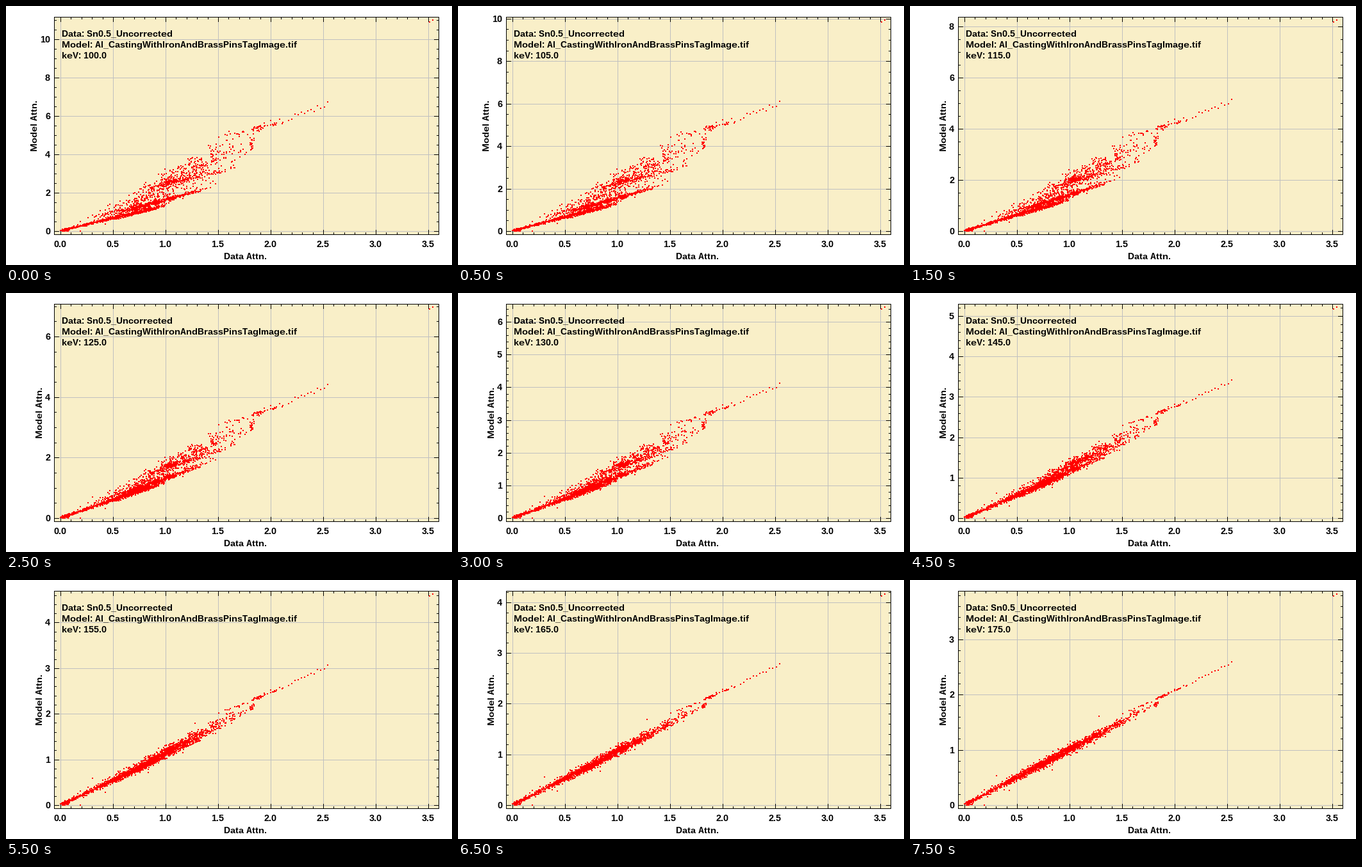
A matplotlib script for the animation above (8 s loop, 696 by 405 pixels).

```python
import matplotlib.pyplot as plt
import numpy as np
from matplotlib.animation import FuncAnimation

W, H, DPI = 696, 405, 72
LEFT, TOP, RIGHT, BOTTOM = 75, 17, 675, 357
X0, Y0, X_SCALE = 85, 352, 164
FRAMES, INTERVAL = 16, 500

plt.rcParams.update({
    "font.family": "Liberation Sans",
    "font.weight": "bold",
    "font.size": 14,
    "text.hinting": "native",
    "text.hinting_factor": 1,
    "text.kerning_factor": 6,
})

fig = plt.figure(figsize=(W / DPI, H / DPI), dpi=DPI, facecolor="white")
ax = fig.add_axes([0, 0, 1, 1])

# Pixels per attenuation unit, a smooth curve through a few energies
SCALE_FIT = np.polyfit([-35, -20, 0, 20, 40], [30, 40, 55.1, 71.4, 86.4], 4)


def y_scale(kev):
    return np.polyval(SCALE_FIT, kev - 135)


def dense(kev):
    """Relative attenuation of the heavy pins, 1 at 175 keV."""
    return y_scale(175) / y_scale(kev)


def light(kev):
    """Relative attenuation of the light casting, 1 at 175 keV."""
    return np.sqrt(175 / kev)


def make_points():
    """Return x and the model value at 100 and 175 keV for every point."""
    rng = np.random.default_rng(12)
    tri, uni = rng.triangular, rng.uniform
    parts = []

    def add(x, ratio, noise):
        """Points near y = x at 175 keV that are ratio times higher at 100."""
        high = np.maximum(x * 1.005 + rng.normal(0, noise, len(x)), 0)
        parts.append((x, ratio * high, high))

    def strand(x, start, slope, noise=0.028):
        add(x, (start + slope * x) / x, noise)

    # origin cluster and casting line
    x = np.abs(rng.normal(0, 0.025, 70))
    parts.append((x, x * 1.3 + 0.03, x + 0.02))
    strand(uni(0.02, 0.5, 270), 0.01, 1.34, 0.022)
    strand(tri(0.42, 0.7, 1.02, 380), 0, 1.31)

    # mixed strand, iron strand and its sparse continuation
    strand(tri(0.5, 0.85, 1.42, 380), 0.135, 1.49)
    strand(tri(0.78, 1.05, 1.33, 130), 1.26, 1.2)
    strand(uni(1.3, 1.66, 32), 1.27, 1.2)

    # scattered mixtures
    add(tri(0.28, 0.7, 1.15, 330), tri(1.25, 1.4, 2.9, 330), 0.045)
    add(tri(0.7, 1.1, 1.5, 300), tri(1.5, 2.4, 3.15, 300), 0.045)
    add(uni(1.22, 1.66, 105), tri(2.0, 2.75, 3.1, 105), 0.04)
    add(rng.normal(1.82, 0.012, 20), uni(2.2, 2.75, 20), 0.02)
    add(uni(1.66, 1.8, 8), uni(2.25, 2.7, 8), 0.02)

    # strays
    x = uni(0, 1.3, 22)
    add(x, uni(1.3, 2.2, 22), 0.2)

    # bent trail of the thickest brass and the far pair
    x = np.concatenate([tri(1.5, 2.0, 2.14, 52), np.linspace(2.17, 2.54, 13)])
    low = np.interp(x, [1.5, 2.05, 2.54], [4.85, 5.62, 6.6])
    low += rng.normal(0, 0.1, len(x))
    x, low = np.append(x, [3.512, 3.543]), np.append(low, [10.9, 11])
    parts.append((x, low, 1.02 * x + 0.34 * (low / 2.6 - 1.02 * x)))
    return [np.concatenate(p) for p in zip(*parts)]


PX, LOW, HIGH = make_points()


def model(kev):
    a, a0 = light(kev), light(100)
    mix = (dense(kev) - a) / (dense(100) - a0)
    return HIGH * a + (LOW - HIGH * a0) * mix


def line(x1, y1, x2, y2, color="black"):
    ax.plot([x1, x2], [y1, y2], color=color, lw=1, antialiased=False,
            solid_capstyle="projecting")


def label(x, baseline, text, **style):
    ax.text(x, baseline - 0.3, text, **style)


def x_tick(x, size):
    line(x, TOP, x, TOP + size)
    line(x, BOTTOM - size, x, BOTTOM)


def y_tick(y, size):
    line(LEFT, y, LEFT + size, y)
    line(RIGHT - size, y, RIGHT, y)


def draw(i):
    kev = 100 + 5 * i
    scale = y_scale(kev)
    ax.clear()
    ax.set(xlim=(0, W), ylim=(H, 0))
    ax.axis("off")
    ax.add_patch(plt.Rectangle((LEFT, TOP), RIGHT - LEFT + 1, BOTTOM - TOP + 1,
                               fc="#f9efc8", ec="none"))

    step, minor = (1, 0.2) if scale >= 50 else (2, 0.5)
    top_value = (Y0 - TOP) / scale
    majors = np.arange(0, top_value, step)
    xs = [X0 + X_SCALE // 2 * k for k in range(8)]
    ys = [int(round(Y0 - v * scale)) for v in majors]

    for x in xs:
        line(x, TOP, x, BOTTOM, "#c0c0c0")
    for y in ys:
        line(LEFT, y, RIGHT, y, "#c0c0c0")

    for k in range(36):
        x_tick(round(X0 + k * X_SCALE / 10), 3)
    for v in np.arange(0, top_value, minor):
        y_tick(round(Y0 - v * scale), 3)
    for k, x in enumerate(xs):
        x_tick(x, 7)
        label(x - 0.5, 377, f"{k / 2:.1f}", ha="center")
    for v, y in zip(majors, ys):
        y_tick(y, 7)
        label(69, y + 5, f"{v:.0f}", ha="right")

    for y in (TOP, BOTTOM):
        line(LEFT, y, RIGHT, y)
    for x in (LEFT, RIGHT):
        line(x, TOP, x, BOTTOM)

    ax.plot(np.round(X0 + PX * X_SCALE), np.round(Y0 - model(kev) * scale),
            "s", color="red", ms=2, mew=0)

    label(374, 396, "Data Attn.", ha="center")
    label(49 if majors[-1] >= 10 else 57, 187, "Model Attn.", rotation=90,
          rotation_mode="anchor", ha="center", va="baseline")
    notes = ("Data: Sn0.5_Uncorrected",
             "Model: Al_CastingWithIronAndBrassPinsTagImage.tif",
             f"keV: {kev:.1f}")
    for k, note in enumerate(notes):
        label(87, 48 + 17 * k, note)
    return []


anim = FuncAnimation(fig, draw, frames=FRAMES, interval=INTERVAL,
                     init_func=lambda: [], repeat=True, repeat_delay=0)
plt.show()
```
